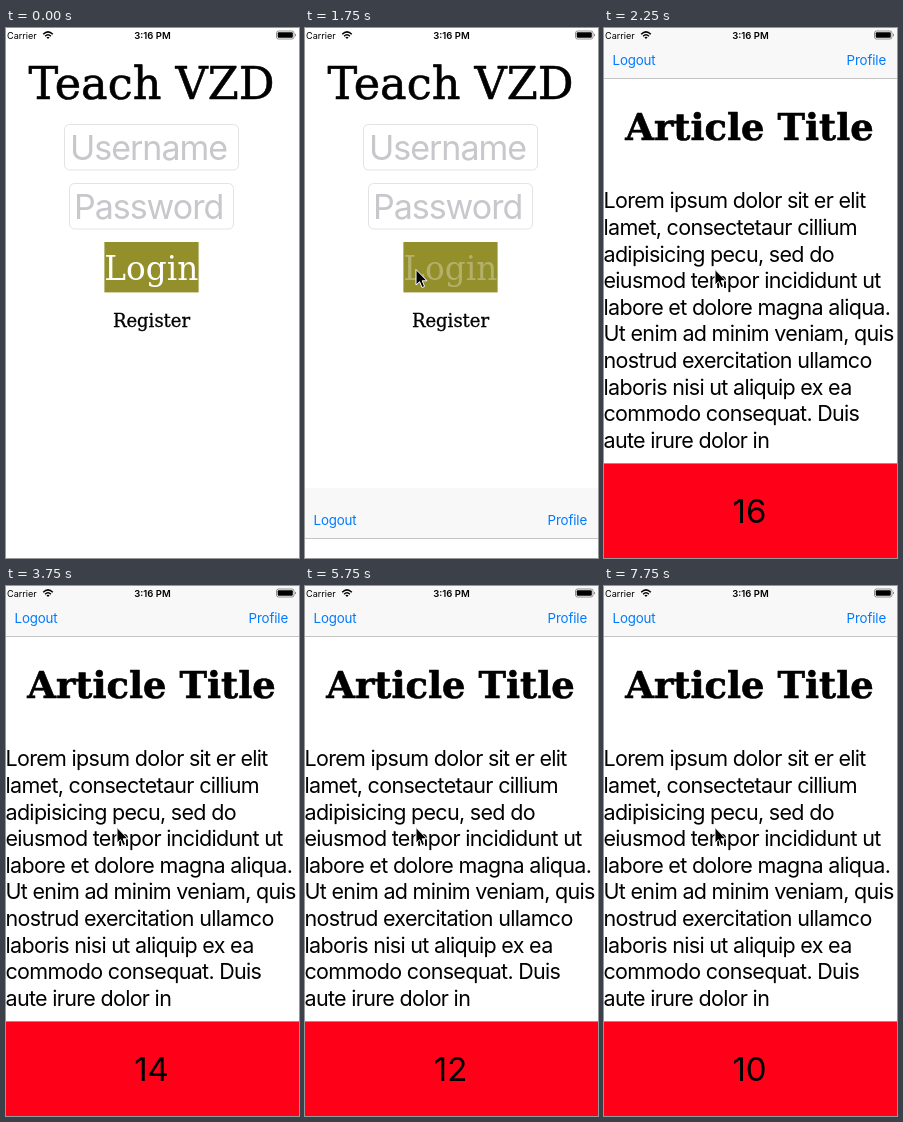
Recreate the animation shown at these times as an HTML page. Size 293 by 530 pixels, loop 8000 ms.

```html
<!DOCTYPE html>
<html lang="en">
<head>
<meta charset="utf-8">
<title>Login and article</title>
<style>
html, body { margin: 0; width: 100%; height: 100%; overflow: hidden; background: #fff; }
svg { display: block; width: 293px; height: 530px; font-family: Inter, sans-serif; }
.slab { font-family: "DejaVu Serif", serif; text-anchor: middle; }
.heavy { stroke: #000; stroke-width: .6; stroke-linejoin: round; }
.field rect { fill: #fff; stroke: #e3e3e3; }
.field text { font-size: 34px; letter-spacing: -.03em; fill: #c7c7cc; }
.nav { font-size: 13.3px; letter-spacing: -.01em; fill: #007aff; }
#body { font-size: 21.5px; letter-spacing: -.032em; }
#count { font-size: 33px; text-anchor: middle; }
.status { font-size: 9.5px; }
</style>
</head>
<body>
<svg viewBox="0 0 293 530">
  <text class="slab heavy" x="145.5" y="71" font-size="44.6">Teach VZD</text>
  <g class="field">
    <rect x="58.5" y="96.5" width="174" height="45.5" rx="5"/>
    <text x="64" y="132">Username</text>
    <rect x="63.5" y="155.5" width="164" height="45.5" rx="5"/>
    <text x="68" y="191">Password</text>
  </g>
  <rect x="98.4" y="214" width="94.2" height="50.4" fill="#938f2b"/>
  <text id="login" class="slab" x="145.3" y="251.5" font-size="32.8" fill="#fff">Login</text>
  <text class="slab" x="145.5" y="299" font-size="18" stroke="#000" stroke-width=".3">Register</text>

  <g id="page">
    <rect width="293" height="530" fill="#fff"/>
    <rect width="293" height="50" fill="#f8f8f8"/>
    <path d="M0 50.5H293" stroke="#c4c4c4"/>
    <text class="nav" x="8.5" y="37.3">Logout</text>
    <text class="nav" x="282" y="37.3" text-anchor="end">Profile</text>
    <text class="slab heavy" x="145.5" y="112" font-size="37" font-weight="bold">Article Title</text>
    <g id="body"></g>
    <rect y="435.4" width="293" height="95" fill="#ff0019"/>
    <text id="count" x="145.5" y="495"></text>
  </g>

  <g class="status">
    <text x="1" y="10.5" font-size="9.1">Carrier</text>
    <path d="M37.2 6.2Q42 1.6 46.8 6.2M39.1 8.2Q42 5.4 44.9 8.2" fill="none" stroke="#000" stroke-width="1.5"/>
    <path d="M40.4 9.3Q42 8 43.6 9.3L42 11Z"/>
    <text x="146.5" y="10.5" text-anchor="middle" font-weight="600">3:16 PM</text>
    <rect x="270.5" y="3" width="17.5" height="8" rx="2" fill="none" stroke="#777" stroke-width=".8"/>
    <rect x="271.7" y="4.2" width="15.1" height="5.6" rx="1"/>
    <path d="M289 5.5Q291 7 289 8.5Z" fill="#777"/>
  </g>
  <path id="cursor" d="M0 0V15.5L3.6 12.2L6 18L8.6 17L6.2 11.3H11Z" stroke="#fff"/>
</svg>
<script>
const STEP = 250, LOOP = 8000;
const $ = id => document.getElementById(id);
const lines = [
  'Lorem ipsum dolor sit er elit', 'lamet, consectetaur cillium',
  'adipisicing pecu, sed do', 'eiusmod tempor incididunt ut',
  'labore et dolore magna aliqua.', 'Ut enim ad minim veniam, quis',
  'nostrud exercitation ullamco', 'laboris nisi ut aliquip ex ea',
  'commodo consequat. Duis', 'aute irure dolor in'
];
$('body').innerHTML = lines
  .map((s, i) => `<text x="-.5" y="${180.3 + i * 26.62}">${s}</text>`).join('');

// One entry per step; the last one holds.
const pointer = [null, [217, 78], [88, 154], [101, 202], [104, 224], [107, 229], [110, 241.5], [111, 241.5]];
const slide = { 7: 460, 8: 22 };

function draw(now) {
  const step = Math.floor(now % LOOP / STEP);
  const at = pointer[Math.min(step, pointer.length - 1)];
  $('cursor').style.display = at ? '' : 'none';
  if (at) $('cursor').setAttribute('transform', `translate(${at})`);
  $('login').setAttribute('fill-opacity', step < 7 ? 1 : .3);
  $('page').style.display = step < 7 ? 'none' : '';
  $('page').setAttribute('transform', `translate(0 ${slide[step] || 0})`);
  $('count').textContent = 16 - Math.max(0, Math.floor((step - 7) / 4));
}

const start = performance.now();
function tick() {
  draw(performance.now() - start);
  requestAnimationFrame(tick);
}
draw(0);
requestAnimationFrame(tick);
</script>
</body>
</html>
```
